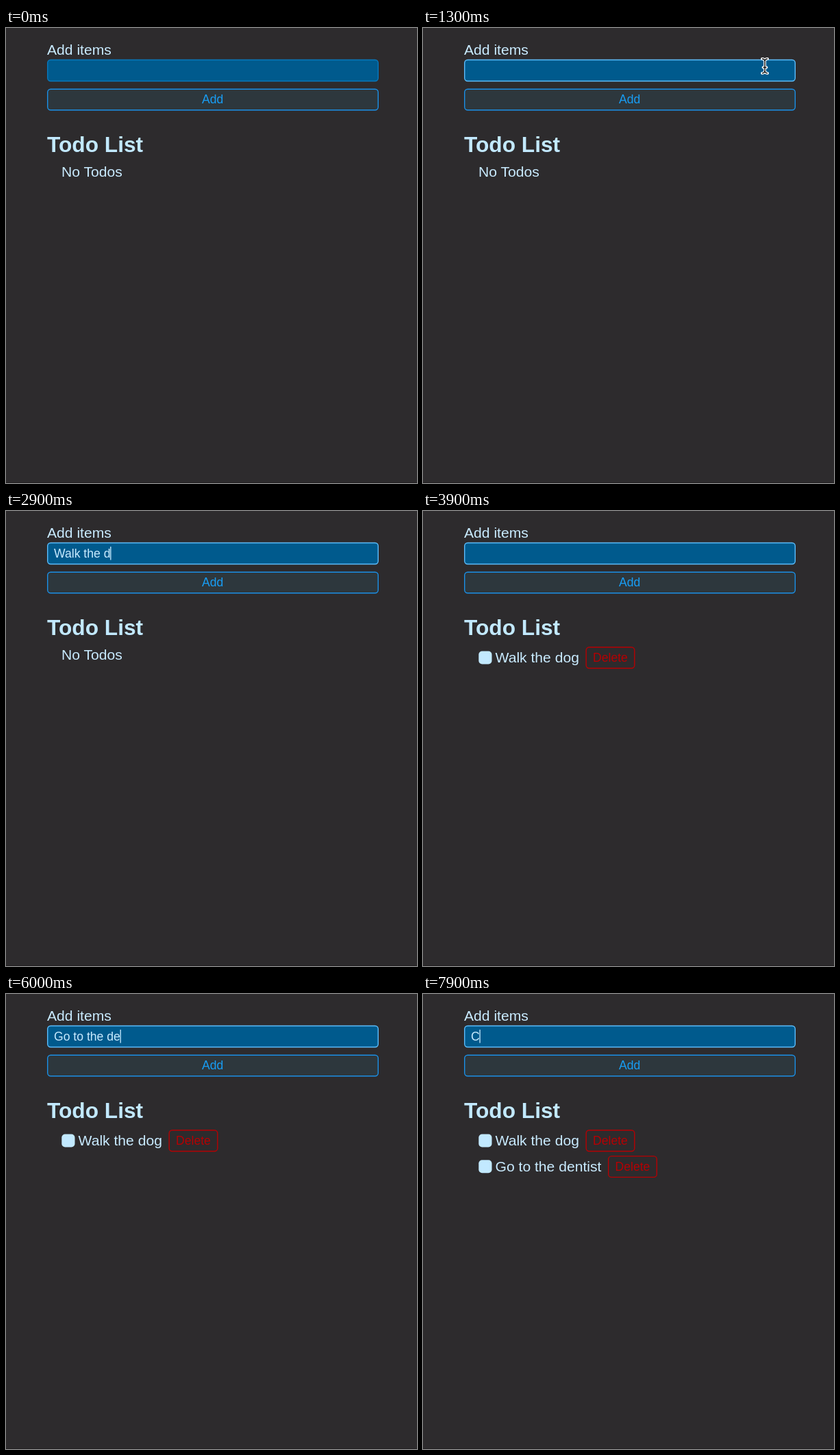
An HTML page for the animation above (8 s loop, 600 px wide and 664 px high).

```html
<!DOCTYPE html>
<html lang="en">
<head>
<meta charset="utf-8">
<title>Todo list</title>
<style>
  html, body { margin: 0; width: 100%; height: 100%; overflow: hidden; background: #2d2b2d; }
  svg { display: block; width: 600px; height: 664px; }
  text { font: 21.12px "Liberation Sans", Arial, sans-serif; fill: #c9ebff; white-space: pre; }
  .title { font-size: 31.68px; font-weight: bold; fill: #c2e9ff; }
  .small { font-size: 17.6px; }
  .box { fill: none; stroke-width: 1.4; }
  .field { fill: #005a8d; stroke: #0778bd; }
  .field.active { stroke: #5dbdfb; }
  .add { fill: #2d373d; stroke: #1b90e6; }
  .add-label { fill: #189df4; text-anchor: middle; }
  .delete { stroke: #b50003; }
  .delete-label { fill: #b50003; }
  .check { fill: #c2e9ff; }
  .cursor path { fill: none; stroke: #fff; stroke-width: 3.8; stroke-linecap: round; }
  .cursor .core { stroke: #111; stroke-width: 1.4; stroke-linecap: butt; }
</style>
</head>
<body>
<svg viewBox="0 0 600 664">
  <defs>
    <path id="beam" d="M495 45q3.500 0 4 3q.5-3 4-3M499 48V63M495 66q3.500 0 4-3q.5 3 4 3M496.500 57.500h5"/>
  </defs>
  <rect y="663" width="600" height="1" fill="#201e20"/>

  <text x="60" y="38.500">Add items</text>
  <rect id="field" class="box field" x="60.700" y="46.500" width="482.600" height="31" rx="4.500"/>
  <text id="typed" class="small" x="70" y="67.600"></text>
  <rect id="caret" y="52" width="1.300" height="19.500" fill="#c9ebff"/>
  <rect class="box add" x="60.700" y="89.200" width="482.600" height="30.600" rx="4.500"/>
  <text class="small add-label" x="301.700" y="109.500">Add</text>

  <text class="title" x="60" y="181">Todo List</text>
  <text id="empty" x="81" y="217">No Todos</text>

  <g id="first">
    <rect class="check" x="81.300" y="204.500" width="19.200" height="19" rx="5"/>
    <text x="105.500" y="220.500">Walk the dog</text>
    <rect class="box delete" x="238.200" y="198.700" width="70.600" height="30.800" rx="4.500"/>
    <text class="small delete-label" x="248" y="220">Delete</text>
  </g>
  <g id="second">
    <rect class="check" x="81.300" y="242.200" width="19.200" height="19" rx="5"/>
    <text x="105.500" y="258.500">Go to the dentist</text>
    <rect class="box delete" x="270.700" y="236.600" width="70.600" height="30.800" rx="4.500"/>
    <text class="small delete-label" x="280.500" y="258">Delete</text>
  </g>

  <g id="cursor" class="cursor">
    <use href="#beam" stroke="#fff"/>
    <path d="M495 45q3.500 0 4 3q.5-3 4-3M499 48V63M495 66q3.500 0 4-3q.5 3 4 3M496.500 57.500h5"/>
    <path class="core" d="M495 45q3.500 0 4 3q.5-3 4-3M499 48V63M495 66q3.500 0 4-3q.5 3 4 3M496.500 57.500h5"/>
  </g>
</svg>
<script>
  const LOOP = 8000, BLINK = 500;
  const HOVER = 300, CLICK = 700;

  // Key times are in tenths of a second.
  const entries = [
    { text: "Walk the dog", keys: [18, 19, 21, 22, 23, 24, 25, 27, 28, 29, 31, 32], done: 3600 },
    { text: "Go to the dentist",
      keys: [45, 47, 48, 49, 51, 52, 53, 55, 56, 57, 58, 60, 61, 63, 64, 66, 67], done: 6900 },
    { text: "C", keys: [78], done: LOOP }
  ];
  const allKeys = entries.flatMap(e => e.keys).map(k => k * 100);

  const el = id => document.getElementById(id);
  const field = el("field"), typed = el("typed"), caret = el("caret");
  const show = (node, on) => { node.style.display = on ? "" : "none"; };

  function draw(t) {
    const entry = entries.find(e => t < e.done);
    const count = entry.keys.filter(k => k * 100 <= t).length;
    const value = entry.text.slice(0, count);
    if (typed.textContent !== value) typed.textContent = value;

    const lastInput = Math.max(CLICK, ...allKeys.filter(k => k <= t));
    const lit = t >= CLICK && Math.floor((t - lastInput) / BLINK) % 2 === 0;
    caret.setAttribute("x", 69.7 + (value ? typed.getComputedTextLength() : 0));
    show(caret, lit);

    field.classList.toggle("active", t >= HOVER);
    show(el("cursor"), t >= HOVER && t < allKeys[0]);
    show(el("empty"), t < entries[0].done);
    show(el("first"), t >= entries[0].done);
    show(el("second"), t >= entries[1].done);
  }

  const start = performance.now();
  function tick() {
    draw((performance.now() - start) % LOOP);
    requestAnimationFrame(tick);
  }
  tick();
</script>
</body>
</html>
```
